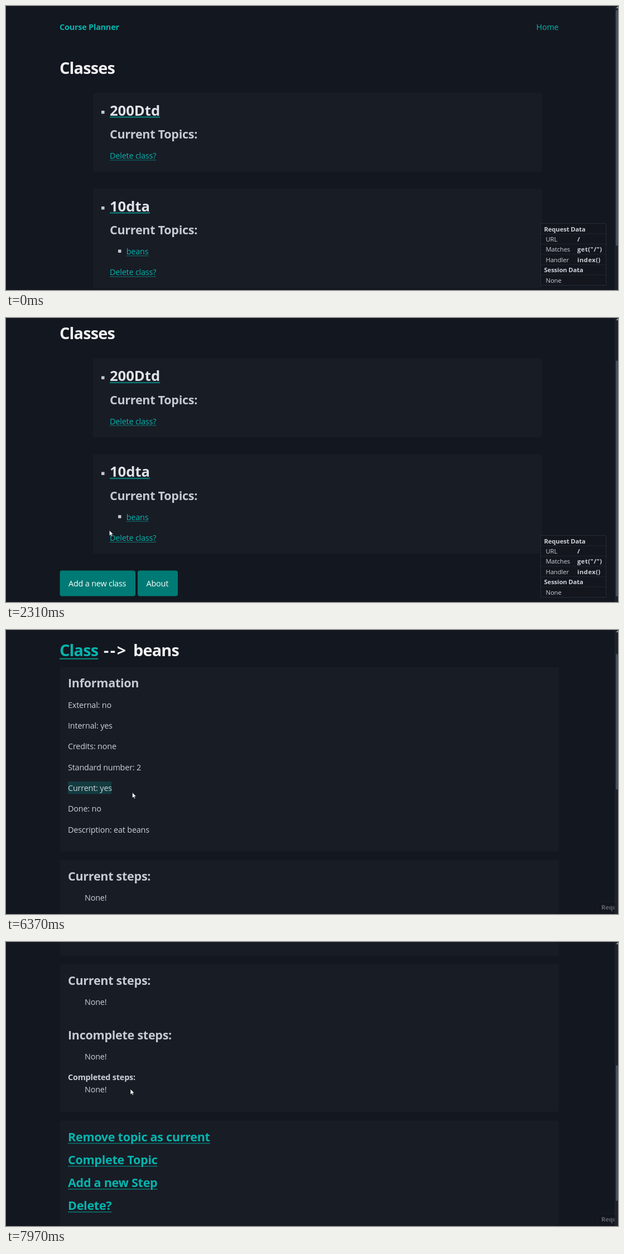
These frames come from a looping animation (1097x510 px, 8000 ms). An HTML page:

```html
<!DOCTYPE html>
<html lang="en">
<head>
<meta charset="utf-8">
<title>Course Planner</title>
<style>
  html, body { margin: 0; width: 100%; height: 100%; overflow: hidden; background: #13171f; }
  svg { position: absolute; left: 0; top: 0; display: block; }
  text { font: 14.35px "Open Sans", "Noto Sans", sans-serif; letter-spacing: -.011em; fill: #cdd1d8; white-space: pre; }
  text.h1 { font-size: 28.8px; font-weight: 700; letter-spacing: -.027em; fill: #f0f1f3; }
  text.h2 { font-size: 25.6px; font-weight: 700; letter-spacing: 0; fill: #e0e3e7; }
  text.h3 { font-size: 21.5px; font-weight: 700; letter-spacing: -.012em; fill: #c6cad2; }
  text.bold { font-weight: 700; letter-spacing: -.012em; }
  text.small { font-size: 11.3px; }
  text.value { letter-spacing: .04em; }
  text.arrow { letter-spacing: .09em; }
  text.teal { fill: #05b5af; }
  text.white { fill: #fff; }
  text.gap { stroke: #181c25; stroke-width: 2.5px; paint-order: stroke; }
</style>
</head>
<body>
<svg id="stage" width="1097" height="510" viewBox="0 0 1097 510"></svg>
<script>
const LOOP = 8000, PAGE_CHANGE = 4910, VIEW = 510, LINE_STEP = 37.3;
const CARD = '#181c25', RULE = '#0a7875', BUTTON = '#007a74', BULLET = '#c2c7d0';
const stage = document.getElementById('stage');

function add(parent, tag, attrs = {}, content) {
  const node = document.createElementNS('http://www.w3.org/2000/svg', tag);
  for (const key in attrs) node.setAttribute(key, attrs[key]);
  if (content) node.textContent = content;
  parent.appendChild(node);
  return node;
}
const rect = (g, x, y, width, height, fill, rx = 0) => add(g, 'rect', { x, y, width, height, fill, rx });
const label = (g, x, y, content, cls = '') => add(g, 'text', { x, y, class: cls }, content);

// The rule goes below the text so that descenders can break it.
function link(g, x, y, content, cls, offset = 2.2, weight = 1) {
  const node = label(g, x, y, content, cls);
  const rule = rect(g, x, y + offset, node.getComputedTextLength(), weight, RULE);
  g.insertBefore(rule, node);
}

function header(g) {
  label(g, 96, 43, 'Course Planner', 'bold teal');
  label(g, 950.5, 43, 'Home', 'teal');
}

function classCard(g, y, height, name, topicName) {
  rect(g, 156, y, 805, height, CARD, 4);
  rect(g, 171, y + 32, 5.5, 5.5, BULLET);
  link(g, 186, y + 40.5, name, 'h2', 1.8, 2.4);
  label(g, 186, y + 82, 'Current Topics:', 'h3');
  if (topicName) {
    rect(g, 201, y + 109.5, 5.5, 5.5, BULLET);
    link(g, 215.7, y + 118, topicName, 'teal');
  }
  link(g, 186, y + 118 + (topicName ? LINE_STEP : 0), 'Delete class?', 'teal');
}

function button(g, x, width, content) {
  rect(g, x, 537, width, 46, BUTTON, 4);
  label(g, x + 15.5, 565.6, content, 'white');
}

function stepList(g, y, title, cls, gap) {
  label(g, 111, y, title, cls);
  label(g, 141, y + gap, 'None!');
}

const classes = add(stage, 'g');
header(classes);
label(classes, 96, 121.5, 'Classes', 'h1');
classCard(classes, 156, 142, '200Dtd');
classCard(classes, 328, 179, '10dta', 'beans');
button(classes, 96.5, 135.5, 'Add a new class');
button(classes, 236, 72, 'About');

const topic = add(stage, 'g');
header(topic);
link(topic, 96, 121.5, 'Class', 'h1 teal', 3.5, 2.6);
label(topic, 175, 121.5, '-->', 'h1 arrow');
label(topic, 228, 121.5, 'beans', 'h1');
rect(topic, 96.5, 141, 894.5, 331.5, CARD, 4);
rect(topic, 96.5, 487.6, 894.5, 265.5, CARD, 4);
rect(topic, 96.5, 768, 894.5, 192, CARD, 4);
const selection = rect(topic, 111, 346.6, 78, 22.6, '#123b40');
label(topic, 111, 178, 'Information', 'h3');
['External: no', 'Internal: yes', 'Credits: none', 'Standard number: 2', 'Current: yes', 'Done: no', 'Description: eat beans']
  .forEach((line, i) => label(topic, 111, 214.5 + i * LINE_STEP, line));
stepList(topic, 524.8, 'Current steps:', 'h3', 36);
stepList(topic, 622.2, 'Incomplete steps:', 'h3', 36);
stepList(topic, 696, 'Completed steps:', 'bold', 22);
['Remove topic as current', 'Complete Topic', 'Add a new Step', 'Delete?']
  .forEach((line, i) => link(topic, 111, 805.4 + i * 41.1, line, 'h3 teal gap', 3, 1.5));

const panel = add(stage, 'g');
add(panel, 'rect', { x: 958.5, y: 390.5, width: 117, height: 111, fill: '#13161d', stroke: '#262b36' });
[['Request Data'], ['URL', '/'], ['Matches', 'get("/")'], ['Handler', 'index()'], ['Session Data'], ['None', '']]
  .forEach(([name, value], i) => {
    const y = 404.5 + i * 18.45, title = value === undefined;
    if (i) rect(panel, 959, y - 14.5, 116, 1, '#20242d');
    label(panel, title ? 964.5 : 967.5, y, name, title ? 'small bold' : 'small');
    if (value) label(panel, 1024, y, value, 'small bold value');
  });

rect(stage, 1091, 0, 6, VIEW, '#1e222b');
const thumb = rect(stage, 1093, 7, 4, 100, '#465062', 2);
add(stage, 'path', { d: 'M1093.5 4l2.5-3 1 1v2z', fill: '#9aa0a9' });

const WHITE = { fill: '#fff', stroke: '#0a0c10', 'stroke-width': .6 };
const pointers = {
  arrow: add(stage, 'path', { d: 'M0 0v10l2.3-2.1 1.6 3.3 1.6-.8-1.6-3.2h3.2z', ...WHITE }),
  hand: add(stage, 'path', { d: 'M-1 .8q1-1.4 2 0v4l4.6 1q1.2.4 1 1.8l-.8 4.6h-5.4l-3.4-4.6q0-1.4 1.2-.8l.8.8z', ...WHITE }),
  beam: add(stage, 'path', { d: 'M-2-4.5h1.5l.5.5.5-.5H2M0-4v8M-2 4.5h1.5l.5-.5.5.5H2',
    fill: 'none', stroke: '#c9ccd2', 'stroke-width': .9 })
};

const progress = (t, from, to) => Math.min(1, Math.max(0, (t - from) / (to - from)));
const easeOut = k => 1 - (1 - k) ** 2;

const classesScroll = t => 83.5 * easeOut(progress(t, 615, 1200));
const topicScroll = t => 74.6 * easeOut(progress(t, 5560, 5900)) + 373 * progress(t, 7180, 7970);

// The pointer rests between legs.
const legs = [
  { from: 600, to: 1200, x: 383, y: 322 },
  { from: 3710, to: 3840, x: 255, y: 367 },
  { from: 3840, to: 4520, x: 236, y: 360 },
  { from: 5230, to: 5290, x: 237, y: 347 },
  { from: 5290, to: 6070, x: 112, y: 288 },
  { from: 6130, to: 6370, x: 227, y: 292 },
  { from: 6370, to: 6620, x: 75, y: 243 },
  { from: 6870, to: 7480, x: 215, y: 293 },
  { from: 7480, to: 7970, x: 223, y: 264 }
];

function circle(t) {
  const turn = (t - 1200) / 800 * 2 * Math.PI;
  return { x: 271 + 112 * Math.cos(turn), y: 322 + 92 * Math.sin(turn) };
}

function pointerAt(t) {
  let p = { x: 683, y: 297 };
  for (const leg of legs) {
    if (t < leg.from) break;
    const k = progress(t, leg.from, leg.to);
    p = { x: p.x + (leg.x - p.x) * k, y: p.y + (leg.y - p.y) * k };
    if (leg === legs[0] && k === 1) p = circle(Math.min(t, legs[1].from));
  }
  return p;
}

function pointerKind(t) {
  if (t < legs[0].from) return '';
  if (t >= 4100 && t < 5290) return 'hand';
  return t >= 7420 && t < 7600 ? 'beam' : 'arrow';
}

const show = (node, visible) => node.setAttribute('visibility', visible ? 'visible' : 'hidden');
const move = (node, x, y) => node.setAttribute('transform', `translate(${x} ${y})`);

function render(t) {
  const onTopic = t >= PAGE_CHANGE;
  const scroll = onTopic ? topicScroll(t) : classesScroll(t);
  const track = 493 / (onTopic ? 1030 : 593.5);
  show(classes, !onTopic);
  show(topic, onTopic);
  show(selection, t >= 6130 && t < 6870);
  move(onTopic ? topic : classes, 0, -scroll);
  move(panel, onTopic ? 102.5 : 0, onTopic ? 97.5 : 0);
  panel.setAttribute('opacity', onTopic ? .4 : 1);
  thumb.setAttribute('y', 7 + scroll * track);
  thumb.setAttribute('height', VIEW * track);

  const { x, y } = pointerAt(t), kind = pointerKind(t);
  for (const name in pointers) {
    show(pointers[name], name === kind);
    move(pointers[name], x, y);
  }
}

const start = performance.now();
function frame() {
  render((performance.now() - start) % LOOP);
  requestAnimationFrame(frame);
}
frame();
</script>
</body>
</html>
```
